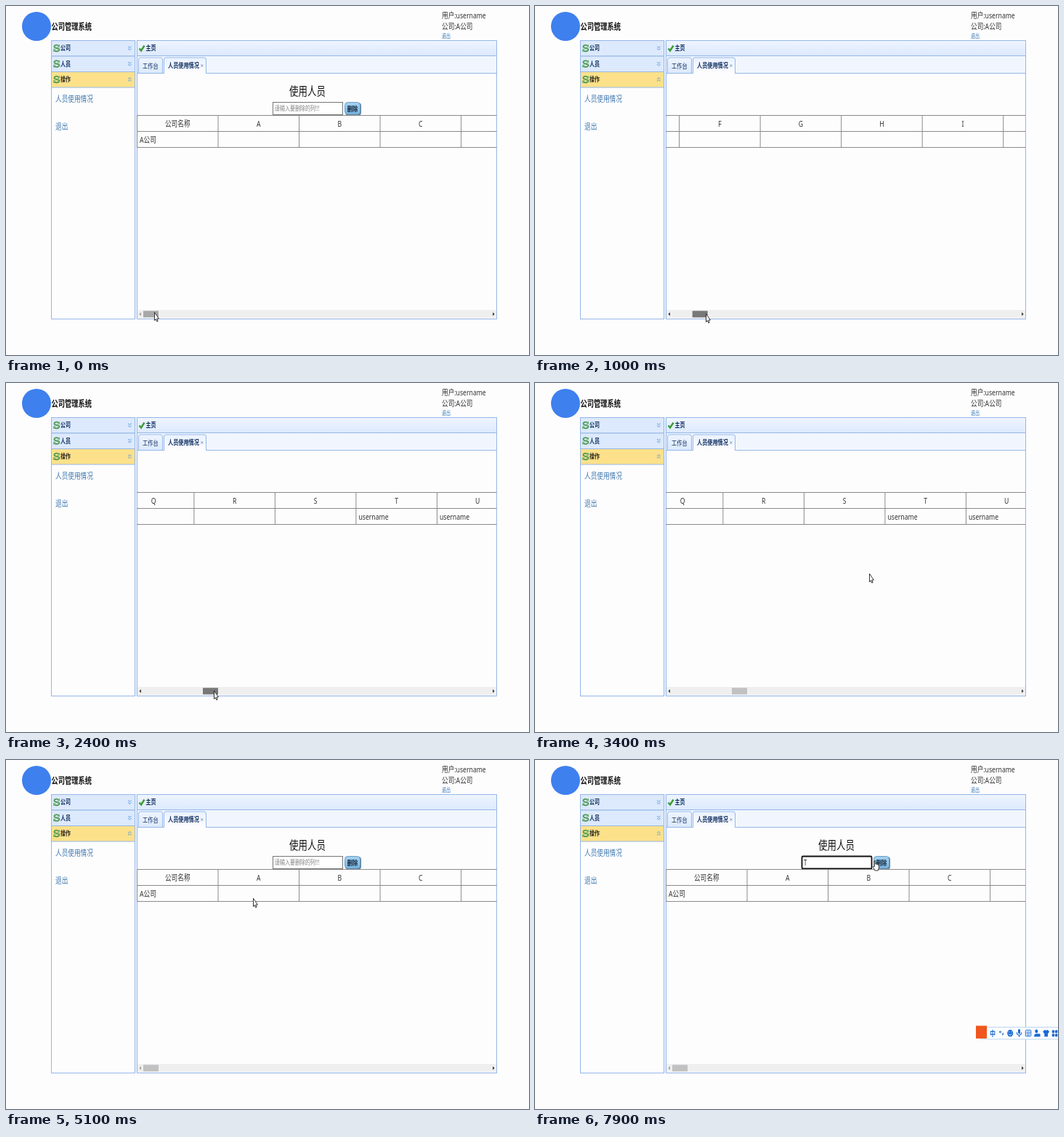
Animation, 720 px wide and 480 px high, one loop 8000 ms. Source, as an HTML page:

```html
<!DOCTYPE html>
<html lang="zh-CN">
<head>
<meta charset="utf-8">
<title>公司管理系统</title>
<style>
html, body { margin: 0; width: 100%; height: 100%; overflow: hidden; background: #fefdfe; }
svg { display: block; }
text { font-family: "Noto Sans", "Noto Sans CJK SC", "Noto Sans CJK", sans-serif; white-space: pre; }
</style>
</head>
<body>
<svg id="stage" width="720" height="480" viewBox="0 0 720 480">
  <defs>
    <linearGradient id="bar" x2="0" y2="1"><stop stop-color="#eff5ff"/><stop offset="1" stop-color="#dce9fd"/></linearGradient>
    <linearGradient id="tab" x2="0" y2="1"><stop stop-color="#eaf2ff"/><stop offset="1" stop-color="#fefdfe"/></linearGradient>
    <linearGradient id="btn" x2="0" y2="1"><stop stop-color="#a5d2f2"/><stop offset="1" stop-color="#79b5e0"/></linearGradient>
    <clipPath id="view"><rect x="180" y="93" width="495.5" height="325"/></clipPath>
  </defs>
</svg>
<script>
const NS = "http://www.w3.org/2000/svg";
const stage = document.getElementById("stage");
const SQUASH = 0.76;   // the whole screen is narrowed by this much
const LOOP = 8000, STEP = 100;
const COL = 111.52, LEFT = 180.5, SCROLL = 23.53;
const NAVY = "#0e2d5f", LINK = "#3f79ae", EDGE = "#95b8e7", INK = "#333", IME = "#1769d2";

function add(parent, tag, attrs) {
  const el = document.createElementNS(NS, tag);
  for (const k in attrs) el.setAttribute(k, attrs[k]);
  parent.appendChild(el);
  return el;
}
const group = (parent, attrs = {}) => add(parent, "g", attrs);
const rect = (parent, x, y, width, height, fill, stroke = "none", more = {}) =>
  add(parent, "rect", { x, y, width, height, fill, stroke, ...more });
const path = (parent, d, stroke, width = 1, fill = "none") =>
  add(parent, "path", { d, stroke, fill, "stroke-width": width });

// y is the middle of the line
function text(parent, x, y, value, size, fill, more = {}) {
  const el = add(parent, "text", {
    transform: `translate(${x} ${y + size * 0.37}) scale(${SQUASH} 1)`,
    "font-size": size, fill, ...more
  });
  el.textContent = value;
  return el;
}
const BOLD = { "font-weight": 700 }, MID = { "text-anchor": "middle" };

// page head
add(stage, "circle", { cx: 42, cy: 28, r: 20, fill: "#3e80ee" });
text(stage, 62.5, 28.5, "公司管理系统", 12.2, "#111", BOLD);
text(stage, 600, 12.3, "用户:username", 11.4, INK);
text(stage, 600, 27.5, "公司:A公司", 11.4, INK);
text(stage, 600, 41, "退出", 8, "#337ab7");

// side menu
rect(stage, 178, 47, 2, 383, "#e9f1fc");
rect(stage, 62.5, 47.5, 115, 383, "#fefdfe", EDGE);
function menuRow(y, label, open) {
  rect(stage, 62.5, y, 115, 21.5, open ? "#fde18a" : "#dde9fc", EDGE);
  const c = y + 10.5;
  path(stage, `M73 ${c - 3}C69 ${c - 6} 65 ${c - 3} 67 ${c - 1}L72 ${c + 1}M66 ${c + 3}C70 ${c + 6} 75 ${c + 3} 73 ${c + 1}L67 ${c - 1}`, "#4d9a55", 1.8);
  path(stage, `M73.5 ${c - 5}V${c - 1.5}H70.5M65.7 ${c + 5}V${c + 1.5}H68.5`, "#6fb572", 1);
  text(stage, 75, c, label, 9.2, open ? "#2b2a20" : NAVY, BOLD);
  const s = open ? -1 : 1;
  for (const d of [-1.5, 1.5])
    path(stage, `M168 ${c + d - s}L170.3 ${c + d + s}L172.6 ${c + d - s}`, "#5b9bdb", 1);
}
menuRow(47.5, "公司", false);
menuRow(69, "人员", false);
menuRow(90.5, "操作", true);
text(stage, 68, 128, "人员使用情况", 11.4, LINK);
text(stage, 68, 166, "退出", 11.4, LINK);

// main panel
rect(stage, 180.5, 47.5, 495, 383, "#fefdfe", EDGE);
rect(stage, 180.5, 47.5, 495, 21, "url(#bar)", EDGE);
path(stage, "M183.5 58.5L186 61.5L190.5 54.5", "#3c9b35", 2.4);
text(stage, 192.5, 58, "主页", 9.2, NAVY, BOLD);
rect(stage, 181, 69, 494, 23.5, "#f1f6fe");
path(stage, "M181 92.5H675", EDGE);
path(stage, "M182.5 92.5V74Q182.5 71 185 71H213Q215.5 71 215.5 74V92.5Z", EDGE, 1, "url(#bar)");
path(stage, "M217.5 93V74Q217.5 71 220 71H273Q275.5 71 275.5 74V93", EDGE, 1, "url(#tab)");
text(stage, 188, 82, "工作台", 9.5, NAVY);
text(stage, 223, 82, "人员使用情况", 9.4, NAVY, BOLD);
path(stage, "M268.3 80.3L271.3 83.7M271.3 80.3L268.3 83.7", "#7f9cc4", 1);

// scrolled content
const view = group(stage, { "clip-path": "url(#view)" });
const sheet = group(view);
text(sheet, 415, 116.5, "使用人员", 16.4, "#111", MID);
const field = rect(sheet, 367.5, 132.5, 96, 17, "#fff", "#767676");
const hint = text(sheet, 370, 141, "请输入要删除的列!!!", 9.2, "#808080");
const typed = text(sheet, 370, 141, "T", 10, "#222");
const compose = path(sheet, "M370 146.5H375M374.5 136.5V146.5", "#222", 0.8);
rect(sheet, 467, 133, 22, 17.5, "#5f7f98", "none", { rx: 4 });
rect(sheet, 466.5, 132.5, 21, 16.5, "url(#btn)", "#6d9fc4", { rx: 4 });
text(sheet, 477, 141, "删除", 9.6, "#14273a", { ...MID, ...BOLD });

const COLS = 28, LINE = "#8b8b8b";
for (const y of [150.5, 172.5, 194.5]) path(sheet, `M180 ${y}H${LEFT + COL * COLS}`, LINE);
for (let i = 0; i < COLS; i++) {
  const x = LEFT + COL * i;
  path(sheet, `M${x} 150V195`, LINE);
  const name = i ? String.fromCharCode(64 + i) : "公司名称";
  if (i < 27) text(sheet, x + COL / 2, 162, name, 11.4, INK, MID);
  const value = i === 0 ? "A公司" : i === 20 || i === 21 ? "username" : "";
  if (value) text(sheet, x + 3.5, 184, value, 11.4, INK);
}

// scrollbar
rect(stage, 181, 418, 494, 11.5, "#f0eff0");
const back = path(stage, "M186 421.3L183.3 423.8L186 426.3Z", "none", 0, "#505050");
path(stage, "M670 421.3L672.7 423.8L670 426.3Z", "none", 0, "#404040");
const thumb = rect(stage, 189, 419.3, 21, 9, "#c1c1c1");

// candidate window
const popup = group(stage);
rect(popup, 368, 149, 97, 64, "#000", "none", { opacity: 0.1, rx: 2 });
rect(popup, 368.5, 148, 96, 63.5, "#fefefe", "#e4e4e4", { rx: 2 });
rect(popup, 370.5, 148.5, 90, 32, "#fff", "#a9cbea");
text(popup, 376, 156, "T", 11, "#5f86a8");
path(popup, "M380.5 150.5V162", "#6f8798", 0.8);
add(popup, "circle", { cx: 452.5, cy: 158, r: 9, fill: "#fbe9dc" });
path(popup, "M451 171.8L453.3 174L455.6 171.8", "#3b8fc9", 1.2);
text(popup, 373.5, 194, "CV", 10, "#999");

// input method bar
const ime = group(stage);
rect(ime, 612, 367.5, 115, 16.5, "#fdfeff", "#bcd6f4", { rx: 3 });
rect(ime, 607, 365.5, 15, 17.5, "#f0561d");
text(ime, 630, 375.7, "中", 10.5, IME, { ...MID, ...BOLD });
add(ime, "circle", { cx: 640.5, cy: 374, r: 1.1, fill: "none", stroke: IME });
path(ime, "M644.3 375.5Q645 377 643.3 378.3", IME, 1.4);
add(ime, "ellipse", { cx: 654.2, cy: 375.8, rx: 4, ry: 4.8, fill: IME });
path(ime, "M652 376.5Q654.2 380 656.4 376.5M652 374H653.3M655.1 374H656.4", "#fff", 1);
rect(ime, 665, 370, 3, 6.5, IME, "none", { rx: 1.5 });
path(ime, "M663.3 374.5Q663.3 378.3 666.5 378.3T669.7 374.5M666.5 378V381", IME, 1.1);
rect(ime, 675.3, 371.5, 7.5, 8.5, "#fff", IME, { rx: 1 });
path(ime, "M676.5 374H681.8M676.5 376H681.8M677 378.2H681", IME, 1);
add(ime, "ellipse", { cx: 690.3, cy: 373, rx: 2, ry: 2.6, fill: IME });
path(ime, "M687 380.5Q687 376.5 690.5 376.5H695.5V380.5Z", "none", 0, IME);
path(ime, "M702 371L699.3 373.3L700.5 376L701.3 375.5V380.5H706V375.5L706.8 376L708 373.3L705.3 371Q703.7 373 702 371Z", "none", 0, IME);
for (const x of [711.8, 716]) for (const y of [371.5, 376.5])
  rect(ime, x, y, 3.4, 4, IME, "none", { rx: 1 });

// pointers, each with its hot spot at 0,0
const pointers = {
  arrow: path(stage, "M.5 .3V11.6L2.3 9.6L3.8 13L5.2 12.3L3.8 9H6.4Z", "#222", 0.9, "#fff"),
  beam: path(stage, "M-2 -5.5H-.6L0 -5L.6 -5.5H2M0 -5V5M-2 5.5H-.6L0 5L.6 5.5H2", "#222", 0.9),
  hand: path(stage, "M-.8 8V1Q0 -.3 .9 1V5.2Q1.8 4.4 2.5 5.6Q3.5 4.9 4 6.2Q5.4 5.8 5.4 7.5V10.5L4.4 14H-.2L-2.6 9.2Q-2.3 7.4 -.8 8.8Z", "#222", 0.9, "#fff")
};

// time, x, y
const POINTER = [
  [0, 204, 421], [1000, 235, 423], [2400, 286, 423], [2500, 286, 423], [2700, 300, 405],
  [3000, 508, 192], [3300, 540, 190], [3600, 300, 405], [3700, 286, 423], [3800, 286, 425],
  [4200, 227, 428], [4400, 204, 428], [4600, 204, 426], [5100, 340, 190], [5600, 400, 142],
  [6000, 400, 142], [6300, 409, 247], [7300, 409, 247], [7800, 468, 138], [LOOP, 468, 138]
];
// time, thumb offset
const THUMB = [[0, 0], [100, 0], [1000, 27.67], [2400, 82], [3800, 82], [4200, 48.15], [4600, 0], [LOOP, 0]];
// time, thumb shade
const SHADE = [[0, "#a8a8a8"], [100, "#787878"], [2600, "#a8a8a8"], [2700, "#c1c1c1"],
  [3700, "#a8a8a8"], [3800, "#787878"], [4600, "#a8a8a8"], [4800, "#c1c1c1"]];
const FADE = [[0, 0], [6500, 0], [6700, 0.88], [6800, 1], [7000, 1], [7100, 0], [LOOP, 0]];

function along(keys, t, i = 1) {
  const n = keys.findIndex(k => k[0] > t), a = keys[n - 1], b = keys[n];
  return a[i] + (b[i] - a[i]) * (t - a[0]) / (b[0] - a[0]);
}
const show = (el, on) => el.setAttribute("visibility", on ? "visible" : "hidden");

function draw(t) {
  const off = along(THUMB, t), x = along(POINTER, t, 1), y = along(POINTER, t, 2);
  sheet.setAttribute("transform", `translate(${-Math.round(off * SCROLL)} 0)`);
  thumb.setAttribute("x", 189 + off);
  thumb.setAttribute("fill", SHADE.filter(s => s[0] <= t).pop()[1]);
  back.setAttribute("fill", off ? "#404040" : "#a3a3a3");

  const focus = t >= 5800, filled = t >= 6500;
  field.setAttribute("stroke", focus ? "#111" : "#767676");
  field.setAttribute("stroke-width", focus ? 1.8 : 1);
  field.setAttribute("rx", focus ? 1.5 : 0);
  show(ime, focus);
  show(hint, !filled);
  show(typed, filled);
  show(compose, filled && t < 7100);
  popup.setAttribute("opacity", along(FADE, t));

  const inRow = off === 0 && y > 132 && y < 150;
  const kind = inRow && x > 466 && x < 488 ? "hand" : inRow && x > 367 && x < 464 ? "beam" : "arrow";
  for (const k in pointers) {
    show(pointers[k], k === kind);
    pointers[k].setAttribute("transform", `translate(${Math.round(x)} ${Math.round(y)})`);
  }
}

function tick() {
  const t = performance.now() % LOOP;
  draw(Math.floor(t / STEP) * STEP);
  requestAnimationFrame(tick);
}
tick();
</script>
</body>
</html>
```
